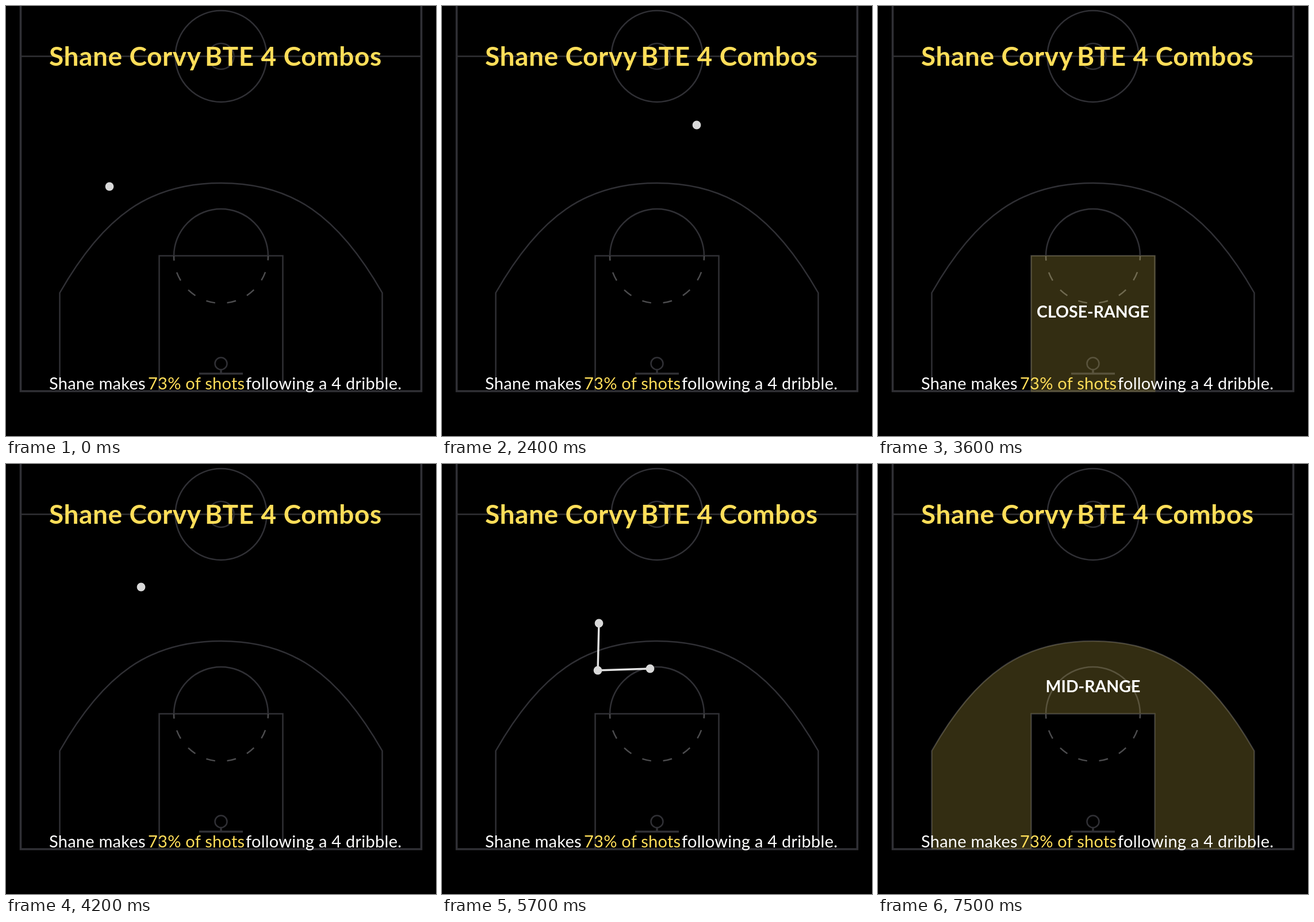
These frames come from a looping animation (748x748 px, 8000 ms). An HTML page:

```html
<!DOCTYPE html>
<html lang="en">
<head>
<meta charset="utf-8">
<title>Dribble combos</title>
<style>
  html, body { margin: 0; width: 100%; height: 100%; overflow: hidden; background: #000; }
  svg { display: block; width: 100vw; height: 100vh; }
  text { font-family: Lato, sans-serif; fill: #fff; }
  .court { fill: none; stroke: #303035; stroke-width: 2.5; }
  .title text { font-size: 46px; font-weight: 700; letter-spacing: .6px; fill: #ffde59; }
  .caption text { font-size: 29px; letter-spacing: .25px; }
  .zone path { fill: #ffde59; fill-opacity: .2; }
  .zone text { font-size: 28.5px; font-weight: 700; text-anchor: middle; }
  .caption .accent { fill: #ffde59; }
</style>
</head>
<body>
<svg viewBox="0 0 748 748">
  <g class="court">
    <path d="M25.5 -5V670H722.5V-5" stroke-width="3.6" style="stroke-width:3.6"/>
    <path d="M25 87.5H722"/>
    <circle cx="374" cy="87.5" r="79.5"/>
    <circle cx="374" cy="87.5" r="22.5"/>
    <path d="M93.5 670V499C170 365 250 308 374 308S578 365 654.5 499V670"/>
    <path d="M266.5 670V434.5H481.5V670"/>
    <path d="M292 435A82 82 0 0 1 456 435"/>
    <path d="M292 435A82 82 0 0 0 456 435" stroke-dasharray="15.8 21" stroke-dashoffset="7.9" style="stroke:#4c4c4e"/>
    <circle cx="374" cy="622" r="10.5"/>
    <path d="M374 632V639M336 639.5H412" style="stroke-width:3.6"/>
  </g>

  <g class="zone" id="close">
    <path d="M266 434H482.5V671.5H266Z"/>
    <text x="374" y="542">CLOSE-RANGE</text>
  </g>
  <g class="zone" id="mid">
    <path d="M93.5 670V499C170 365 250 308 374 308S578 365 654.5 499V670H481.5V434.5H266.5V670Z"/>
    <text x="374" y="397">MID-RANGE</text>
  </g>

  <g id="combo"></g>

  <g class="title">
    <text x="75" y="104">Shane Corvy</text>
    <text x="346" y="104">BTE 4 Combos</text>
  </g>
  <g class="caption">
    <text x="75" y="667">Shane makes</text>
    <text x="247" y="667" class="accent">73% of shots</text>
    <text x="417" y="667">following a 4 dribble.</text>
  </g>
</svg>
<script>
const LOOP = 8000, STEP = 300;

// Each scene is a dribble path that grows one point per step, or a zone label.
const scenes = [
  { at: 0,    path: [[180, 314], [226, 387], [322, 344], [347, 527]] },
  { at: 1200, path: [[514, 301], [484, 366], [422, 375], [363, 467]] },
  { at: 2400, path: [[443, 207], [484, 310], [473, 375], [492, 536]] },
  { at: 3600, zone: "close" },
  { at: 4200, path: [[235, 214], [308, 305], [347, 390]] },
  { at: 5100, path: [[273, 277], [271, 359], [362, 356], [365, 360]] },
  { at: 6300, path: [[542, 211], [477, 315], [503, 358], [518, 396]] },
  { at: 7500, zone: "mid" }
];

const combo = document.getElementById("combo");
const zones = [...document.querySelectorAll(".zone")];
let shown = "";

function drawPath(path, count) {
  const points = path.slice(0, count);
  const dots = points.map(([x, y], i) =>
    `<circle cx="${x}" cy="${y}" r="7.4" fill="${i === path.length - 1 ? "#ffde59" : "#d9d9d9"}"/>`);
  return `<polyline points="${points.join(" ")}" fill="none" stroke="#e2e2e2" stroke-width="3.4"/>` + dots.join("");
}

function render(now) {
  const time = now % LOOP;
  const scene = scenes.findLast(s => s.at <= time);
  const count = Math.floor((time - scene.at) / STEP) + 1;
  const key = `${scene.at}/${count}`;
  if (key !== shown) {
    shown = key;
    combo.innerHTML = scene.path ? drawPath(scene.path, count) : "";
    for (const zone of zones) zone.style.display = zone.id === scene.zone ? "" : "none";
  }
}

const start = performance.now();
function tick() {
  render(performance.now() - start);
  requestAnimationFrame(tick);
}
tick();
</script>
</body>
</html>
```
